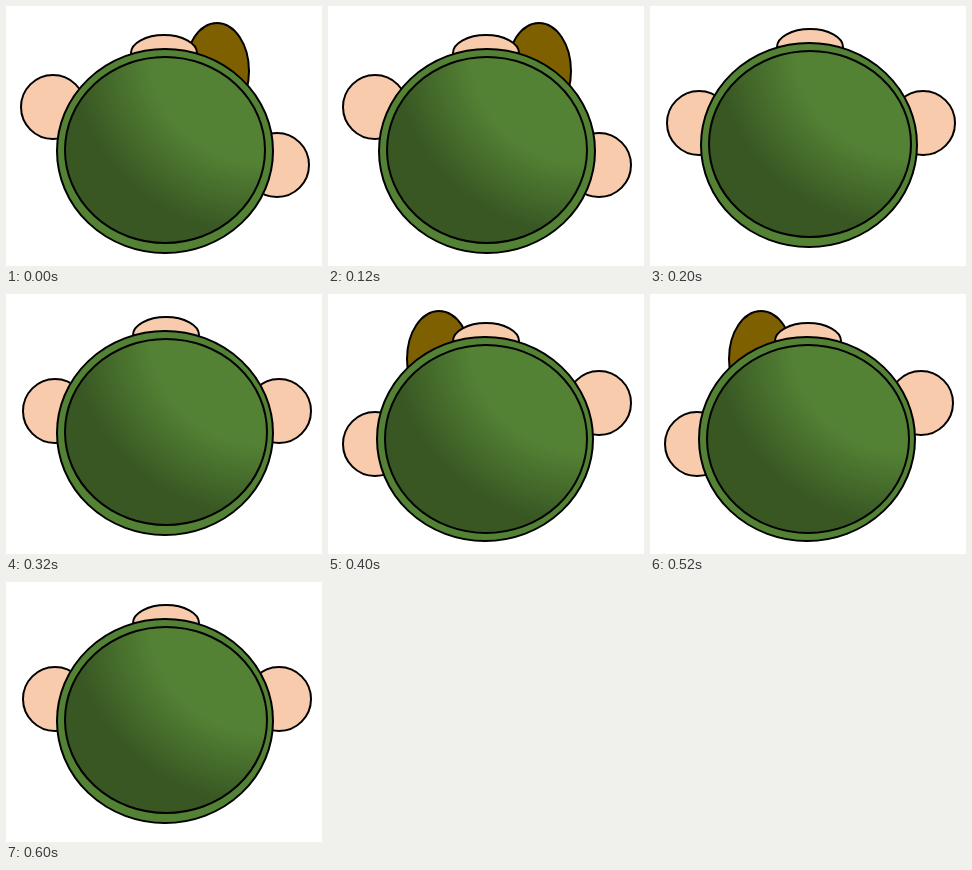
Animation, 316 px wide and 260 px high, one loop 800 ms. Source, as an HTML page:

```html
<!DOCTYPE html>
<html lang="en">
<head>
<meta charset="utf-8">
<title>Walking figure from above</title>
<style>
html, body { margin: 0; width: 100%; height: 100%; overflow: hidden; background: #fff; }
svg { display: block; width: 316px; height: 260px; }
ellipse { stroke: #000; stroke-width: 2; }
.skin { fill: #f8cbad; }
</style>
</head>
<body>
<svg viewBox="0 0 316 260">
  <defs>
    <radialGradient id="shade" cx="1" cy="0" r="1.414" fx="1" fy="0">
      <stop offset=".4" stop-color="#548235"/>
      <stop offset=".68" stop-color="#385723"/>
    </radialGradient>
  </defs>
  <ellipse id="foot" rx="32" ry="48" fill="#7f6000"/>
  <ellipse id="left" class="skin" rx="32" ry="32"/>
  <ellipse id="right" class="skin" rx="32" ry="32"/>
  <ellipse id="head" class="skin" rx="33" ry="18"/>
  <ellipse id="rim" rx="108" ry="102" fill="#548235"/>
  <ellipse id="shell" fill="url(#shade)"/>
</svg>
<script>
const STEP = 200;

// Each part: [cx, cy] or [cx, cy, rx, ry]
const stand = {
  left: [49, 117], right: [273, 117], head: [160, 41],
  rim: [159, 139], shell: [160, 138, 101, 93]
};
const stepRight = {
  foot: [211, 65], left: [47, 101], right: [271, 159], head: [158, 47],
  rim: [159, 145], shell: [159, 144, 100, 93]
};
const stepLeft = {
  foot: [111, 65], left: [47, 150], right: [271, 109], head: [158, 47],
  rim: [157, 145], shell: [158, 145, 101, 94]
};
const walk = [stepRight, stand, stepLeft, stand];
const attrs = ["cx", "cy", "rx", "ry"];

function draw(time) {
  const pose = walk[Math.floor(time / STEP) % walk.length];
  for (const part of document.querySelectorAll("ellipse")) {
    const place = pose[part.id];
    part.style.display = place ? "" : "none";
    if (place) place.forEach((value, i) => part.setAttribute(attrs[i], value));
  }
}

const start = performance.now();
function tick() {
  draw(performance.now() - start);
  requestAnimationFrame(tick);
}
tick();
</script>
</body>
</html>
```
